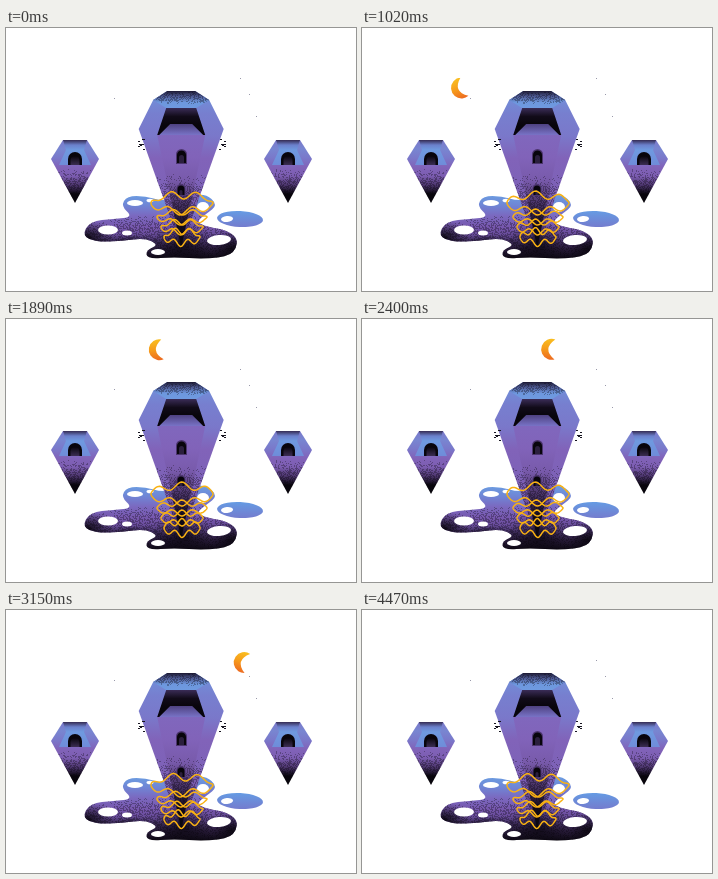
An HTML page with a canvas that plays this animation: 350x263 px, repeating every 4.5 s.

```html
<!DOCTYPE html>
<html lang="en">
<head>
<meta charset="utf-8">
<title>Crystal towers</title>
<style>
  html, body { margin: 0; width: 100%; height: 100%; overflow: hidden; background: #fff; }
  canvas { display: block; }
</style>
</head>
<body>
<canvas id="stage" width="350" height="263"></canvas>
<script>
const LOOP = 4.5, W = 350, H = 263, TAU = Math.PI * 2, DEG = TAU / 360;
const BLUE = '#6b9fe2', VIOLET = '#8163b9', MID = '#7a78ca', INK = '#08050c';
const view = document.getElementById('stage').getContext('2d');

let seed = 7;
const random = () => (seed = (seed * 16807) % 2147483647) / 2147483647;
const clamp = v => Math.min(1, Math.max(0, v));

function layer(draw) {
  const canvas = document.createElement('canvas');
  canvas.width = W;
  canvas.height = H;
  draw(canvas.getContext('2d'));
  return canvas;
}

function polygon(points) {
  const path = new Path2D();
  points.forEach(([x, y]) => path.lineTo(x, y));
  path.closePath();
  return path;
}

// Points are [distance from axis, y], listed from top to bottom.
const mirrored = (cx, points) => polygon([
  ...points.map(([d, y]) => [cx + d, y]),
  ...points.slice().reverse().map(([d, y]) => [cx - d, y])
]);

// Smooth closed curve through the midpoints of the given points.
function blob(points) {
  const path = new Path2D(), n = points.length;
  const mid = i => {
    const a = points[i % n], b = points[(i + 1) % n];
    return [(a[0] + b[0]) / 2, (a[1] + b[1]) / 2];
  };
  path.moveTo(...mid(n - 1));
  points.forEach((p, i) => path.quadraticCurveTo(...p, ...mid(i)));
  path.closePath();
  return path;
}

function arch(x, top, bottom, r) {
  const path = new Path2D();
  path.arc(x, top + r, r, Math.PI, 0);
  path.lineTo(x + r, bottom);
  path.lineTo(x - r, bottom);
  path.closePath();
  return path;
}

function fade(c, y0, y1, ...colors) {
  const g = c.createLinearGradient(0, y0, 0, y1);
  colors.forEach((color, i) => g.addColorStop(i / (colors.length - 1), color));
  return g;
}

function fill(c, path, style) {
  c.fillStyle = style;
  c.fill(path);
}

// Faint grain, strongest between y0 and y1.
function grain(c, path, y0, y1) {
  c.save();
  c.clip(path);
  c.fillStyle = 'rgba(8,5,12,.3)';
  for (let y = y0; y < y1; y++) {
    const density = .5 * Math.sin(Math.PI * (y - y0) / (y1 - y0));
    for (let x = 40; x < 310; x++) if (random() < density) c.fillRect(x, y, 1, 1);
  }
  c.restore();
}

function shadow(c, x, y, rx, ry, alpha) {
  c.save();
  c.translate(x, y);
  c.scale(rx, ry);
  const g = c.createRadialGradient(0, 0, 0, 0, 0, 1);
  g.addColorStop(0, `rgba(8,5,12,${alpha})`);
  g.addColorStop(1, 'rgba(8,5,12,0)');
  c.fillStyle = g;
  c.fillRect(-1, -1, 2, 2);
  c.restore();
}

function oval(c, x, y, rx, ry, tilt = 0) {
  c.beginPath();
  c.ellipse(x, y, rx, ry, tilt, 0, TAU);
  c.fill();
}

function drawPuddle(c) {
  const shape = blob([
    [76, 208], [84, 193], [108, 191], [127, 189], [115, 178], [121, 168], [140, 168],
    [155, 173], [178, 170], [199, 165], [212, 177], [200, 186], [190, 194], [202, 199],
    [221, 202], [233, 212], [226, 228], [198, 231], [168, 229], [141, 231], [140, 222],
    [153, 217], [139, 210], [116, 213], [91, 214]
  ]);
  fill(c, shape, fade(c, 166, 232, BLUE, '#6f86d6', '#7b68bf', '#7657ad', '#614690', '#2b1d3e', INK));
  c.save();
  c.clip(shape);
  shadow(c, 82, 210, 28, 17, .9);
  shadow(c, 125, 215, 34, 9, .7);
  shadow(c, 226, 221, 22, 20, .8);
  shadow(c, 176, 218, 34, 24, .75);
  c.restore();
  grain(c, shape, 186, 231);
  c.fillStyle = fade(c, 183, 199, '#659be3', '#747cce');
  oval(c, 234, 191, 23, 8, .05);
  c.fillStyle = '#fff';
  oval(c, 129, 175, 8, 3);
  oval(c, 144, 172.5, 3.5, 1.8);
  oval(c, 102, 202, 10, 4.5);
  oval(c, 121, 205, 5, 2.5);
  oval(c, 213, 212, 12, 5, -.08);
  oval(c, 152, 224, 7, 3);
  oval(c, 197, 179, 6, 5);
  oval(c, 221, 191, 6, 3, -.1);
  c.fillStyle = '#99a';
  for (const [x, y] of [[108, 70], [234, 50], [243, 66], [250, 88]]) c.fillRect(x, y, 1, 1);
}

function drawGem(c, cx) {
  const body = mirrored(cx, [[12, 112], [24, 131], [0, 175]]);
  fill(c, body, fade(c, 112, 175, MID, '#7886d1', MID, VIOLET, '#7c5db1', '#4c356d', INK, INK));
  fill(c, mirrored(cx, [[9, 122], [16, 137]]), fade(c, 122, 137, '#6f9ae0', '#6f8cd9'));
  fill(c, mirrored(cx, [[12, 112], [9, 122]]), fade(c, 112, 122, '#352b53', '#6b80cc', '#6f9ae0'));
  grain(c, body, 140, 170);
  fill(c, arch(cx, 124, 137, 7), INK);
  fill(c, arch(cx, 128, 137, 4.5), fade(c, 128, 137, INK, '#3c2e53'));
}

function drawWindow(c, x, top, bottom, r) {
  fill(c, arch(x, top, bottom, r), '#4b356d');
  fill(c, arch(x, top + 1.5, bottom - 1, r - 1), INK);
  fill(c, arch(x, top + 6, bottom - 1, r - 3), '#2b1f3d');
}

function drawTower(c) {
  const cx = 175.2;
  const body = mirrored(cx, [[14, 63], [28, 72], [42.5, 101], [0, 220]]);
  fill(c, body, fade(c, 63, 220, '#6f94dc', '#777fcf', MID, VIOLET, '#7e62b8', '#775aad', '#51397a', INK));
  const front = mirrored(cx, [[24, 107], [0, 220]]);
  fill(c, front, fade(c, 107, 220, '#8067bd', VIOLET, '#785aab', '#4a3468', '#130c1a', INK));
  const roof = mirrored(cx, [[14, 63], [28, 72], [15, 80]]);
  fill(c, roof, fade(c, 63, 80, '#1b1730', '#4f5c96', '#6d97de', '#6f9ae0'));
  fill(c, mirrored(cx, [[15, 80], [24, 107]]), fade(c, 80, 97, '#3a2c57', '#110b19', INK));
  fill(c, mirrored(cx, [[11, 96], [22, 107]]), fade(c, 96, 107, '#4e4181', '#7873c6'));
  grain(c, roof, 63, 76);
  grain(c, body, 145, 205);
  drawWindow(c, 175.5, 121, 136, 5.5);
  drawWindow(c, 175, 156, 168, 4.5);
  c.fillStyle = '#171520';
  for (let i = 0; i < 12; i++) {
    const d = 38 + random() * 5, y = 110 + Math.floor(random() * 14);
    c.fillRect(Math.round(cx - d), y, 2, 1);
    c.fillRect(Math.round(cx + d), y, 2, 1);
  }
}

const ground = layer(drawPuddle);
const towers = layer(c => {
  drawGem(c, 69);
  drawGem(c, 282);
  drawTower(c);
});

function drawMoon(c, t) {
  const angle = (178.2 - 40.3 * t) * DEG;
  const drift = Math.max(0, t - 3.9) * 12;
  c.save();
  c.translate(170.5 + 102 * Math.cos(angle) + drift, 131 - 102 * Math.sin(angle));
  c.rotate((-42 + 18.5 * t) * DEG);
  c.beginPath();
  c.arc(4, 0, 10.5, -72 * DEG, 72 * DEG, true);
  c.quadraticCurveTo(-6, 0, 7.2, -10);
  c.fillStyle = fade(c, -10, 10, '#f9bd20', '#f69a1b', '#ed6c20');
  c.fill();
  c.restore();
}

// Each ring: centre y, radii, wave height.
const rings = [[175, 31, 8, 4], [189, 25, 5, 3], [199, 21, 5, 3], [209, 18, 6, 3.5]];

function drawRings(c, t) {
  c.strokeStyle = '#f9b213';
  c.lineWidth = 1.5;
  c.lineJoin = 'round';
  rings.forEach(([cy, rx, ry, height], i) => {
    const swing = .5 - .5 * Math.cos(TAU * (t - 1.7 - i * .08) / LOOP);
    c.beginPath();
    for (let a = 0; a < TAU; a += .05) {
      const x = Math.cos(a), y = Math.sin(a);
      const phase = swing * (y < 0 ? Math.PI : .6);
      c.lineTo(176 + rx * x, cy + y * (ry + height * Math.cos(7.8 * x + phase)));
    }
    c.closePath();
    c.stroke();
  });
}

function frame(now) {
  const t = now / 1000 % LOOP;
  view.fillStyle = '#fff';
  view.fillRect(0, 0, W, H);
  view.drawImage(ground, 0, 0);
  drawMoon(view, t);
  view.drawImage(towers, 0, 0);
  drawRings(view, t);
  requestAnimationFrame(frame);
}
requestAnimationFrame(frame);
</script>
</body>
</html>
```
